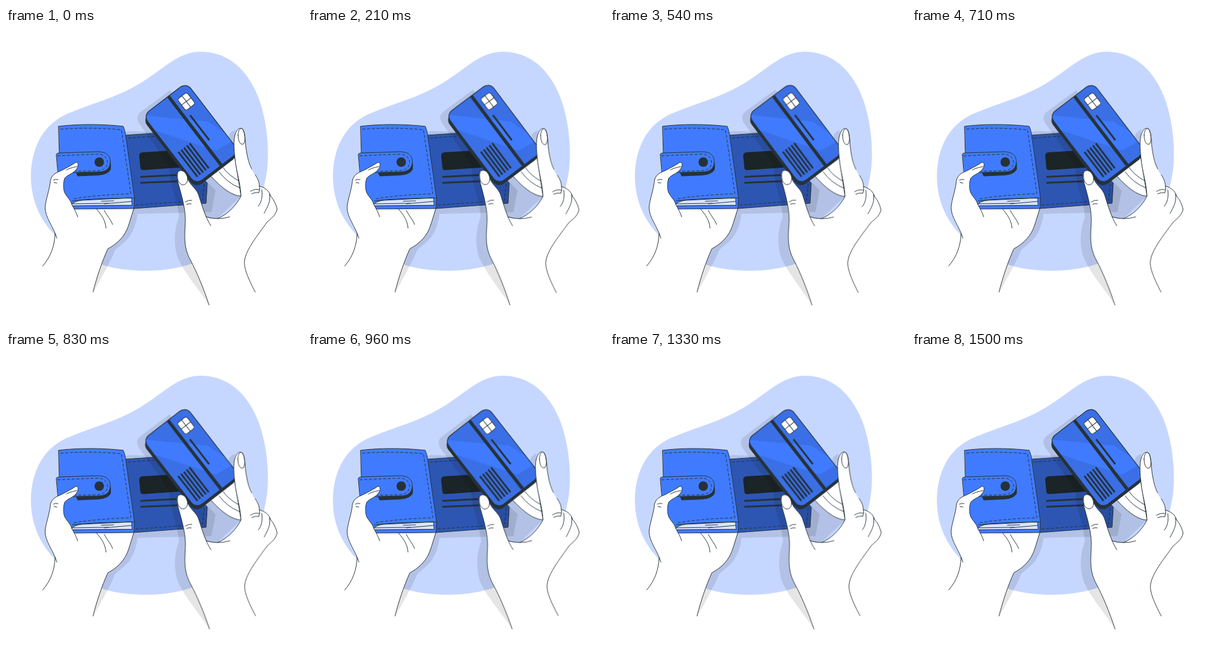
Recreate the animation shown at these times as an HTML page without scripts. Size 500 px wide and 500 px high, loop 1.54 s.

```html
<!DOCTYPE html>
<html lang="en">
<head>
<meta charset="utf-8">
<title>Wallet and card</title>
<style>
  html, body { margin: 0; width: 100%; height: 100%; overflow: hidden; background: #fff; }
  svg { display: block; width: 100vw; height: 100vh; }
  .ink { fill: none; stroke: #263238; stroke-width: 1; stroke-linecap: round; stroke-linejoin: round; }
  .bar { stroke-width: 3; stroke-linecap: butt; }
  .stitch { stroke-dasharray: 5 3; stroke-linecap: butt; }
  .blue { fill: #407bff; }
  .face { fill: #3a6fe6; }
  .deep { fill: #2d56b3; }
  .page { fill: #d9e5ff; }
  .skin { fill: #fff; }
  .dark { fill: #263238; }
  .shade { fill: #000; opacity: .1; }
  .sway { transform-origin: 338px 283px; animation: sway 1540ms linear infinite; }
  /* swing lasts 1500 ms, then rests for the last 40 ms */
  @keyframes sway {
    0%, 97.4%, 100% { transform: rotate(0deg); }
    24.35% { transform: rotate(1deg); }
    73.05% { transform: rotate(-1deg); }
  }
</style>
</head>
<body>
<svg viewBox="0 0 500 500">
  <path fill="#c6d7ff" d="M42 250C43 196 67 159 108 143C147 127 187 117 224 95C262 73 290 40 328 40C369 40 401 63 421 105C439 142 446 200 441 240C432 300 412 340 370 370C330 398 285 410 237 410C190 410 150 400 122 382C75 352 42 310 42 250Z"/>

  <g id="wallet-back">
    <path class="shade" d="M200 176L208 174L262 176L340 260L354 274L347 311L222 314C221 328 215 343 209 352C200 364 188 370 184 376C178 392 162 420 148 446L160 390L200 340Z"/>
    <path class="ink deep" d="M202 181L262 177L340 262L338 296L216 305Z"/>
    <path class="ink stitch" d="M206 186L262 182M219 299L332 291L335 262"/>
    <path fill="#1b2427" d="M230 210L298 206L304 235L232 240Q227 240 227 236L225 216Q225 211 230 210Z"/>
    <path class="ink bar" d="M227 251.500L296 248M227 261.500L300 258.500"/>
  </g>

  <g id="left-hand">
    <path class="skin" d="M62 402C75 385 82 368 84 350C78 335 66 320 66 303C67 290 74 272 75 258L98 250L111 304H216C211 320 208 332 204 341C197 356 185 366 172 373C162 395 153 422 147 446L62 446Z"/>
    <path class="ink" d="M216 305C211 320 208 332 204 341C197 356 185 366 172 373C162 395 153 422 147 446M153 306C161 315 168 325 169 338M166 308C171 318 178 325 180 332"/>
  </g>

  <g id="wallet-front">
    <path class="ink blue" d="M89 166C120 162 162 162 198 166Q201 172 202 180L217 287L216 305L100 306L97 280L91 245Z"/>
    <path class="ink page" d="M109 300Q115 292 128 291L212 287L213 299Z"/>
    <path class="ink" d="M112 297L173 296M161 292.500L182 292M166 297L212 293M112 292C145 288 180 288 217 287"/>
    <path class="ink stitch" d="M92 171Q145 167 195 172L211 280Q150 282 112 289"/>
    <path class="dark" d="M176 224Q178 232 177 239Q172 248 156 249L121 250.500L117 242L160 240Z"/>
    <path class="ink blue" d="M85 213Q86 211 90 211L155 209C172 209 177 218 176 228C175 238 168 243 157 243L88 245Z"/>
    <path class="ink stitch" d="M87 216L155 213C176 213 178 240 155 241L114 242"/>
    <circle class="dark" cx="157.500" cy="226.500" r="8"/>
  </g>

  <g id="left-thumb">
    <path class="skin" d="M86 355C80 335 66 320 66 303C67 290 74 272 75 258C77 247 86 244 93 241C103 236 112 231 118 227C122 226 123 232 120 237C115 246 104 247 99 254C96 264 97 272 99 278C103 286 109 290 111 298C115 306 119 311 121 319L110 360Z"/>
    <path class="ink" d="M62 402C76 386 82 368 83 347M86 355C80 335 66 320 66 303C67 290 74 272 75 258C77 247 86 244 93 241C103 236 112 231 118 227C122 226 123 232 120 237C115 246 104 247 99 254C96 264 97 272 99 278C103 286 109 290 111 298C115 306 119 311 121 319M102 240Q105 237 120 234M80 257Q83 255 88 256M81 261L86 262"/>
  </g>

  <g class="sway">
    <path class="shade" d="M277 105L226 143Q219 150 224 160L276 233C275 262 292 298 292 320C284 340 283 365 289 385C298 410 325 440 343 468L303 360L320 322H357L397 284L350 250L384 210L387 172Q376 176 376 186L300 130Z"/>

    <g id="fingers">
      <path class="ink skin" d="M346 250L386 216L397 284C380 283 362 268 346 250Z"/>
      <path class="ink" d="M360 243Q374 262 395 270M367 236Q376 249 393 258"/>
    </g>

    <g id="card" transform="translate(304.500 92) rotate(52.500)">
      <rect class="ink dark" x="4" y="4" width="147" height="92" rx="13"/>
      <rect class="ink face" width="147" height="92" rx="13"/>
      <path class="blue" d="M2 89L75 11L107 .5H126L122 30L32 91.500Z"/>
      <path class="dark" d="M.5 35.500H146.500V41H.5Z"/>
      <rect class="ink skin" x="13.500" y="9.500" width="24" height="20" rx="4"/>
      <path class="ink" d="M13.500 19.500H37.500M25.500 9.500V29.500"/>
      <path class="ink bar" d="M48 28.500H101M85 58h53m-53 6h53m-53 6h53m-53 6h53m-53 6h53"/>
      <rect class="ink" width="147" height="92" rx="13"/>
    </g>

    <g id="right-hand">
      <path class="skin" d="M343 468C334 440 322 412 312 393C299 370 302 350 303 325C303 300 294 275 289 255C287 245 291 240 297 241C304 243 306 250 308 257C313 267 321 271 325 281C331 299 334 312 338 319Q345 323 357 322C372 316 387 303 397 284C396 262 389 242 387 222C385 205 384 190 387 180C390 170 396 167 400 171C404 177 404 190 405 200C408 222 413 236 419 246C425 253 428 260 428 267C439 270 445 276 447 284C452 289 456 298 458 306C455 318 447 322 441 328C425 350 405 375 403 393C401 405 410 425 421 446Z"/>
      <path class="ink" d="M343 468C334 440 322 412 312 393C299 370 302 350 303 325C303 300 294 275 289 255C287 245 291 240 297 241C304 243 306 250 308 257C313 267 321 271 325 281C332 303 337 320 346 334M338 319Q358 325 378 319M357 322C372 316 387 303 397 284C396 262 389 242 387 222C385 205 384 190 387 180C390 170 396 167 400 171C404 177 404 190 405 200C408 222 411 230 415 238M421 248C425 254 428 260 428 267C439 270 445 276 447 284C452 289 456 298 458 306C455 318 447 322 441 328C425 350 405 375 403 393C401 405 410 425 421 446"/>
      <path class="ink" d="M290 244C289 254 290 262 298 265C306 265 308 258 306 249M303 294Q308 290 314 291M305 298Q309 296 313 297M392 181C392 173 396 168 399 170C404 176 405 192 401 196C395 198 392 190 392 181ZM413 276Q420 271 428 273M415 280Q421 277 427 278M428 267Q430 272 427 278M432 273C434 285 431 296 426 301M445 280C448 293 441 303 436 313"/>
    </g>
  </g>
</svg>
</body>
</html>
```
